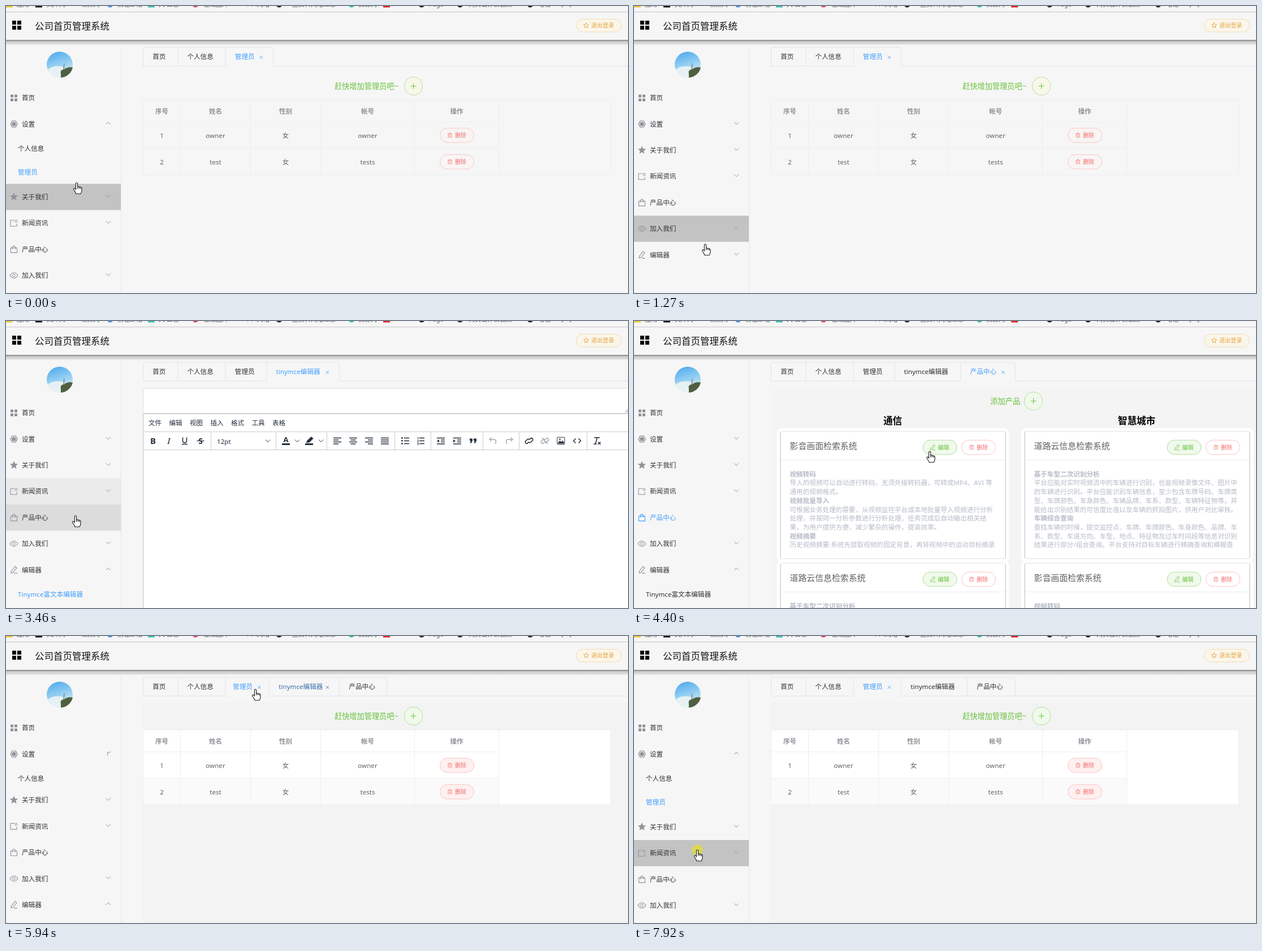
An HTML page for the animation above (8 s loop, 1100x509 px).

```html
<!DOCTYPE html>
<html lang="zh-CN">
<head>
<meta charset="utf-8">
<style>
html, body { margin: 0; width: 100%; height: 100%; overflow: hidden; background: #f6f6f6; }
svg { display: block; }
text { font-family: 'Noto Sans', 'Noto Sans CJK SC', 'Noto Sans CJK', sans-serif; white-space: pre; }
</style>
</head>
<body>
<svg id="stage" width="1100" height="509"></svg>
<script>
const LOOP = 8000, INK = '#303133', BLUE = '#409eff', GREEN = '#67c23a', RED = '#f56c6c', GREY = '#909399';

// ---- time ----
// [first change, last change, number of changes]
const bursts = [[60, 320, 4], [460, 1190, 11], [1270, 2060, 12], [2140, 2880, 11], [2960, 3590, 10], [3730, 4460, 11],
  [4540, 4980, 7], [5140, 5940, 12], [6020, 6750, 11], [6830, 7620, 12], [7700, 7920, 4]];
const snap = t => {
  let s = 0;
  for (const [a, b, n] of bursts) {
    const d = (b - a) / (n - 1);
    if (t >= a) s = a + Math.min(n - 1, Math.floor((t - a) / d + .12)) * d;
  }
  return s;
};
const clamp = v => Math.max(0, Math.min(1, v));
const ease = v => (v = clamp(v), v * v * (3 - 2 * v));
const easeOut = v => 1 - (1 - clamp(v)) ** 2;
const during = (t, a, b, f = ease) => f((t - a) / 300) - f((t - b) / 300);
const mix = (p, a, b) => `rgb(${a.map((v, i) => Math.round(v + (b[i] - v) * p))})`;
const toBlue = p => mix(p, [48, 49, 51], [64, 158, 255]);

// ---- drawing helpers ----
const text = (s, x, mid, size = 11.6, fill = INK, more = '') =>
  `<text x="${x}" y="${mid + size * .37}" font-size="${size}" fill="${fill}" ${more}>${s}</text>`;
const rect = (x, y, w, h, fill, stroke = 'none', r = 0) =>
  `<rect x="${x}" y="${y}" width="${w}" height="${h}" rx="${r}" fill="${fill}" stroke="${stroke}"/>`;
const line = (d, stroke, w = 1, fill = 'none') =>
  `<path d="${d}" fill="${fill}" stroke="${stroke}" stroke-width="${w}"/>`;
const circle = (x, y, r, fill, stroke = 'none') => `<circle cx="${x}" cy="${y}" r="${r}" fill="${fill}" stroke="${stroke}"/>`;
const at = (x, y, s, more = '') => `<g transform="translate(${x} ${y}) ${more}">${s}</g>`;
const MID = 'text-anchor="middle"', BOLD = 'font-weight="700"';
const starPath = r => 'M' + [...Array(10).keys()].map(i => {
  const a = i * Math.PI / 5, q = i % 2 ? r * .45 : r;
  return (q * Math.sin(a)).toFixed(2) + ' ' + (-q * Math.cos(a)).toFixed(2);
}).join('L') + 'Z';

const icons = {
  home: c => [[-6, -6], [1, -6], [-6, 1], [1, 1]].map(([x, y]) => rect(x, y, 5, 5, c, 'none', .5)).join(''),
  gear: c => line('M-3 -5.5H3L6 0L3 5.5H-3L-6 0Z', c, 1.4) + circle(0, 0, 3.6, c),
  star: c => line(starPath(7), c, .5, c),
  news: c => line('M1 -5H-6V5.5H5V1', c, 1.1) + circle(4, -3.5, 2, 'none', c),
  bag: c => line('M-5.5 -2.5H5.5V6H-5.5ZM-2.5 0V-4Q0 -8 2.5 -4V0', c, 1.1),
  eye: c => line('M-7 0Q0 -9.5 7 0Q0 9.5 -7 0Z', c, 1.1) + circle(0, 0, 2.3, 'none', c),
  pen: c => line('M-5 5.5L-4.5 2L2 -6L5 -3.5L-1.5 4.5ZM0 6H6', c, 1.1),
  trash: c => line('M-5 -3H5M-3.7 -3V4.5H3.7V-3M-1.5 -3V-5H1.5V-3M-1.2 -.5V2.5M1.2 -.5V2.5', c, .9),
  down: c => line('M-4 -2L0 2L4 -2', c, 1)
};
const icon = (name, x, y, c = GREY, scale = 1) => at(x, y, icons[name](c), `scale(${scale})`);
const pill = (x, mid, label, name, c, fill, edge) =>
  rect(x + .5, mid - 12.7, 60, 25.5, fill, edge, 12.7) + icon(name, x + 18, mid, c, .8) + text(label, x + 27, mid, 10, c);
const remove = (x, mid, fill) => pill(x, mid, '删除', 'trash', RED, fill, '#fbc4c4');
const plus = (x, fill) => circle(x, 142, 16.2, fill, '#b3e19d') + line(`M${x - 5} 142H${x + 5}M${x} 137V147`, GREEN);

// ---- fixed frame ----
function browserBar() {
  const words = [[19, '应用'], [72, '文库网'], [133, '视频网'], [197, '前往邮箱'], [270, '大 日志'], [349, '在线图片'], [422, '个人网站'],
    [495, '一些资料网站汇总'], [623, '资源网'], [748, 'Page'], [818, '网页设计模板集'], [941, '笔记'], [979, '学习']];
  const dots = [[184, '#4a90e2'], [335, '#e2445c'], [483, '#222'], [611, '#2bbfae'], [735, '#222'], [803, '#222'], [927, '#222']];
  const blocks = [[0, '#f3c53c'], [52, '#111'], [251, '#3dbfae'], [667, '#d22']];
  return words.map(([x, s]) => text(s, x, -3.5, 11, '#555')).join('') +
    dots.map(([x, c]) => circle(x, -3, 5.5, c)).join('') +
    blocks.map(([x, c]) => rect(x, -9, 12, 11.5, c)).join('') + rect(0, 10, 1100, 1, '#c6c6c6');
}
function header() {
  return [[11, 26], [20, 26], [11, 35], [20, 35]].map(([x, y]) => rect(x, y, 7, 7, '#000')).join('') +
    text('公司首页管理系统', 51, 36, 16.5, '#111') +
    rect(1008.5, 23.5, 80, 22.5, '#fbf6ea', '#f5dab1', 11.2) +
    at(1026, 34.5, line(starPath(4.8), '#e6a23c', .9)) + text('退出登录', 1035, 34.5, 10.1, '#e6a23c') +
    rect(0, 60, 1100, 10, 'url(#shade)') + rect(203, 72, 1, 437, '#e7e7e7');
}
const avatar = circle(95, 104, 23, 'url(#sky)') +
  line('M74 113Q84 103 104 109L97 127A23 23 0 0 1 74 113Z', 'none', 0, '#e6f1f3') +
  line('M97 127L97 120Q95 113 103 112Q110 107 118 109A23 23 0 0 1 97 127Z', 'none', 0, '#4f6040') +
  line('M103 102L102 113', '#8a9a8c', 2);
const defs = `<defs>
<linearGradient id="sky" x2=".3" y2="1"><stop stop-color="#4aa6ea"/><stop offset=".55" stop-color="#8fcdf3"/><stop offset="1" stop-color="#dceef5"/></linearGradient>
<linearGradient id="shade" x2="0" y2="1"><stop stop-color="#8a8a8a"/><stop offset=".2" stop-color="#a4a4a4"/><stop offset=".32" stop-color="#cfcfcf"/><stop offset=".6" stop-color="#d4d4d4"/><stop offset="1" stop-color="#f6f6f6"/></linearGradient></defs>`;
const frame = defs + rect(0, 0, 1100, 509, '#f6f6f6') + browserBar() + header() + avatar;

// ---- side menu ----
const hovers = [['about', -400, 90], ['mgr', 90, 130], ['info', 130, 170], ['set', 160, 700],
  ['about', 770, 850], ['news', 850, 910], ['goods', 910, 950], ['join', 950, 1290], ['edit', 1290, 1800], ['rich', 1790, 2340],
  ['edit', 2340, 2430], ['join', 2430, 2530], ['goods', 2530, 2620], ['news', 2620, 2700], ['about', 2690, 2990],
  ['news', 2990, 3215], ['goods', 3295, 3760], ['mgr', 7150, 7300], ['about', 7300, 7620], ['news', 7620, 9000]];
const menu = [['home', '首页', 'home'], ['set', '设置', 'gear', [['info', '个人信息'], ['mgr', '管理员']]],
  ['about', '关于我们', 'star', []], ['news', '新闻资讯', 'news', []], ['goods', '产品中心', 'bag'],
  ['join', '加入我们', 'eye', []], ['edit', '编辑器', 'pen', [['rich', 'Tinymce富文本编辑器']]]];
const ROW = 46.4, SUB = 41.4;

function sideMenu(t, active) {
  const opened = f => ({ set: 1 - during(t, 540, 5805, f), edit: f((t - 1480) / 300) });
  const open = opened(ease), turn = opened(easeOut);
  const shade = (id, y, h) => {
    const p = hovers.reduce((s, [k, a, b]) => k === id ? s + during(t, a, b, clamp) : s, 0);
    return p > .01 ? rect(0, y, 203, h, mix(clamp(p), [246, 246, 246], [195, 195, 195])) : '';
  };
  let y = 139.8, out = '';
  for (const [id, label, name, subs] of menu) {
    const mid = y + ROW / 2, on = id === active, o = open[id] || 0;
    out += shade(id, y, ROW) + icon(name, 14, mid, on ? BLUE : GREY) + text(label, 28, mid, 11.6, on ? BLUE : INK);
    if (subs) out += at(181, mid - 1.5, icons.down(GREY), `rotate(${180 * (turn[id] || 0)})`);
    y += ROW;
    if (o > 0 && subs) {
      const h = subs.length * SUB * o;
      out += `<svg x="0" y="${y}" width="203" height="${h}">` + subs.map(([k, s], i) =>
        shade(k, i * SUB, SUB) + text(s, 21, (i + .5) * SUB - .3, 11.6, k === active ? BLUE : INK)).join('') + '</svg>';
      y += h;
    }
  }
  return out;
}

// ---- tabs ----
function tabBar(t, active) {
  const list = [['home', '首页', 23.2, 0, 0], ['info', '个人信息', 46.4, 0, 0],
    ['mgr', '管理员', 34.8, 1 - during(t, 2080, 5810), during(t, 5560, 5810)]];
  if (t >= 2080) list.push(['rich', 'tinymce编辑器', 79,
    1 - ease((t - 3700) / 300) + during(t, 5100, 5810), during(t, 4800, 5100)]);
  if (t >= 3700) list.push(['goods', '产品中心', 46.4, 1 - ease((t - 5100) / 300), 0]);
  let x = 242.5, out = '', gap = [x, x];
  for (const [id, label, w, act, hover] of list) {
    const lit = clamp(act + hover), pad = 16.7 - 5.8 * hover, end = x + 2 * pad + w + 4.6 + 11.7 * lit, c = toBlue(lit);
    out += text(label, x + pad, 90, 11.6, c);
    if (lit > .3) out += line(`M${end - pad - 7} 88.5l5 5m0 -5l-5 5`, c, .9);
    if (x > 243) out += line(`M${x} 73V106`, '#e0e4eb');
    if (id === active) gap = [x, end];
    x = end;
  }
  return out + line(`M242.5 106V76Q242.5 73.5 245 73.5H${x - 3}Q${x} 73.5 ${x} 76V106`, '#e0e4eb') +
    line(`M242 106.5H${gap[0]}M${gap[1]} 106.5H1100`, '#e0e4eb');
}

// ---- pages ----
function tablePage(solid) {
  const edges = [242.5, 308.5, 432.5, 556.5, 722.5, 871.5], border = '#ebeef5';
  const row = (cells, mid, c, more = '') => cells.map((s, i) =>
    text(s, (edges[i] + edges[i + 1]) / 2, mid, 11.6, c, MID + ' ' + more)).join('');
  return (solid ? rect(242, 118, 858, 391, '#f3f3f3') + rect(242, 166, 828, 134, '#fff') + rect(242, 253, 630, 47, '#fafafa') : '') +
    text('赶快增加管理员吧~', 581, 142, 13.2, GREEN) + plus(720.5, solid ? '#f0f9eb' : '#f8f7ea') +
    rect(242.5, 166.5, 827, 133, 'none', border) +
    line('M242 205.5H872M242 252.5H872' + edges.slice(1).map(x => `M${x} 166V300`).join(''), border) +
    row(['序号', '姓名', '性别', '帐号', '操作'], 186.5, GREY, BOLD) +
    row(['1', 'owner', '女', 'owner'], 229.5, '#606266') + row(['2', 'test', '女', 'tests'], 276.5, '#606266') +
    [229.3, 276.3].map(y => remove(767, y, solid ? '#fef0f0' : '#f8f5f4')).join('');
}

function toolbar() {
  const c = '#222f3e', off = '#a3a9b0', y = 212.5;
  const menus = ['文件', '编辑', '视图', '插入', '格式', '工具', '表格'];
  const rows = (x, widths, k) => widths.map((w, i) => `M${x - 7 + (14 - w) * k} ${207.5 + i * 3.5}h${w}`).join('');
  const aligns = [[586, 0], [614, .5], [642, 1], [670, 0]].map(([x, k], i) => rows(x, i < 3 ? [14, 9, 14, 9] : [14, 14, 14, 14], k)).join('');
  const lists = [706, 733].map(x => [207.5, 212.5, 217.5].map(v => `M${x - 2} ${v}h9`).join('')).join('');
  const indents = [769, 798].map(x => `M${x - 7} 207.5h14M${x} 211h7M${x} 214.5h7M${x - 7} 218h14`).join('');
  const chain = 'M-1 2.5L-3 4.5A2.6 2.6 0 0 1 -6.5 1L-3 -2.5A2.6 2.6 0 0 1 .8 -2M1 -2.5L3 -4.5A2.6 2.6 0 0 1 6.5 -1L3 2.5A2.6 2.6 0 0 1 -.8 2';
  return menus.map((s, i) => text(s, 252 + i * 36.5, 181, 11.6, c)).join('') +
    line('M242 196.5H1100M242 228.5H1100' + [362, 477, 567, 687, 751, 843, 907, 1027].map(x => `M${x}.5 197V228`).join(''), '#ccc') +
    text('B', 260, y, 15, c, MID + ' ' + BOLD) + text('I', 288, y, 15, c, MID + ' font-style="italic" style="font-family:Noto Serif,serif"') +
    line('M312.5 206.5V212Q312.5 216 316 216T319.5 212V206.5M311 218.5H321', c, 1.6) +
    text('S', 344, y, 14, c, MID + ' font-weight="600"') + line('M337.5 212.5H350.5', c, 1.3) +
    text('12pt', 373, 213.5, 11.6, c) + [463, 515, 557].map(x => at(x, y, icons.down(c))).join('') +
    text('A', 495, 210.5, 13, c, MID + ' ' + BOLD) + rect(488, 217, 14, 3, c) + rect(529, 217, 14, 3, c) +
    line('M533 212L540 205.5L543 208.5L536.5 215L531.5 215.5Z', c, 1, c) +
    line(aligns + lists + indents, c, 1.5) +
    [207.5, 212.5, 217.5].map((v, i) => circle(700.5, v, 1.4, c) + text(i + 1, 728.5, v, 6, c, MID + ' ' + BOLD)).join('') +
    line('M766 210V215.5L762 212.7ZM791 210V215.5L795 212.7Z', 'none', 0, c) +
    line('M820 208.5h5v4l-2 4h-2.5l1.5 -4h-2zM827 208.5h5v4l-2 4h-2.5l1.5 -4h-2z', 'none', 0, c) +
    line('M858.5 206.5L855 210L858.5 213.5M855 210H863Q867 210.5 866.5 215L865 218M892.5 206.5L896 210L892.5 213.5M896 210H888Q884 210.5 884.5 215L886 218', off, 1.4) +
    at(925, y, line(chain, c, 1.6)) + at(953, y, line(chain + 'M-5 -5.5L5 5.5', off, 1.5)) +
    rect(974.8, 206.2, 13, 12.6, 'none', c, 1) + line('M976 217L979.5 212.5L982 215L984.5 212.5L987 217Z', c, .8, c) + circle(979.5, 209.8, 1.3, c) +
    line('M1007.5 208.5L1003.5 212.5L1007.5 216.5M1012.5 208.5L1016.5 212.5L1012.5 216.5', c, 1.5) +
    line('M1040 206.8H1050M1045.5 207L1042.5 217.5M1039 218H1044.5M1047 214.5l4.5 4.5m0 -4.5l-4.5 4.5', c, 1.5);
}
const editorPage = ready => rect(242.5, 119.5, 870, 44, '#fff', '#dcdfe6', 2) + line('M1095 162L1100 157M1098 162L1100 160', '#888') +
  rect(242.5, 164.5, 870, 360, '#fff', '#bdbdbd') + (ready ? toolbar() : '');

// A leading * marks a bold line.
const cards = [
  ['影音画面检索系统', `*视频转码
导入的视频可以自动进行转码，无须外接转码器，可转成MP4、AVI 等
通用的视频格式。
*视频批量导入
可根据业务处理的需要，从视频监控平台或本地批量导入视频进行分析
处理，并按同一分析参数进行分析处理，任务完成后自动输出相关结
果，为用户提供方便，减少繁杂的操作，提高效率。
*视频摘要
历史视频摘要:系统先提取视频的固定背景，再将视频中的运动目标摘录`],
  ['道路云信息检索系统', `*基于车型二次识别分析
平台应能对实时视频流中的车辆进行识别，也能视频录像文件、图片中
的车辆进行识别。平台应能识别车辆信息，至少包含车牌号码、车牌类
型、车牌颜色、车身颜色、车辆品牌、车系、款型、车辆特征物等，并
能给出识别结果的可信度比值以及车辆的抓拍图片，供用户对比审核。
*车辆综合查询
查找车辆的时候，提交监控点、车牌、车牌颜色、车身颜色、品牌、车
系、款型、车道方向、车型、地点、特征物及过车时间段等信息对识别
结果进行部分/组合查询。平台支持对目标车辆进行精确查询和模糊查`]];
const card = (x, y, [title, body]) => at(x, y,
  rect(-6, -5, 411, 238, '#fff', 'none', 9) + rect(.5, .5, 398, 226, '#fff', '#e2e2e6', 3) + line('M.5 2V225M398.5 2V225', '#dcdce0', 2) +
  text(title, 17, 26.5, 14.9, '#606266') + line('M2 51.5H397', '#ebeef5') +
  pill(252, 29, '编辑', 'pen', GREEN, '#f0f9eb', '#b3dfa0') + remove(320.5, 29, '#fff') +
  body.split('\n').map((s, i) => text(s.replace('*', ''), 17, 76.5 + i * 15.7, 11.6, '#b4bac6', s[0] === '*' ? BOLD : '')).join(''));
const goodsPage = () => rect(242, 118, 858, 391, '#f4f4f4') + text('添加产品', 630, 142, 13.3, GREEN) + plus(706.5, '#f0f9eb') +
  text('通信', 457.5, 177, 16.6, '#000', MID + ' ' + BOLD) + text('智慧城市', 889, 177, 16.6, '#000', MID + ' ' + BOLD) +
  [0, 1, 2, 3].map(i => card(258.5 + i % 2 * 432, 195 + (i >> 1) * 234, cards[(i + (i >> 1)) % 2])).join('');

// ---- pointer: [time, x, y] of the fingertip ----
const path = [[0, 125, 313], [320, 150, 228], [460, 150, 228], [600, 151, 236], [760, 151, 236], [1190, 127, 418], [1270, 126, 422],
  [1420, 130, 436], [1560, 132, 438], [1900, 140, 474], [2140, 141, 474], [2280, 142, 454], [2760, 150, 250], [2960, 146, 258],
  [3450, 123, 345], [3590, 122, 348], [3800, 122, 348], [4380, 521, 236], [4460, 545, 176], [4620, 598, 140], [4980, 525, 94],
  [5350, 520, 94], [5640, 441, 94], [6100, 441, 94], [6750, 226, 218], [6900, 222, 222], [7300, 118, 322], [7620, 112, 363], [7860, 112, 379], [8000, 112, 379]];
const clicks = [460, 1480, 2050, 3700, 5100, 5800, 7880];
function pointer(t) {
  const i = Math.max(1, path.findIndex(p => p[0] >= t)), [a, ax, ay] = path[i - 1], [b, bx, by] = path[i];
  const p = (t - a) / (b - a), x = ax + (bx - ax) * p, y = ay + (by - ay) * p;
  return (clicks.some(c => t >= c && t < c + 120) ? circle(x, y + .5, 9.8, 'rgba(226,220,50,.75)') : '') +
    at(x, y, line('M-1.6 1.6Q0 -1 1.6 1.6V8Q3.2 6.5 4.4 8.2Q6 7 7 8.8Q8.6 8.2 9 10.2V14Q9 17 7 20H-1Q-2 17 -5 13Q-6 11 -4.2 10.3Q-3 10.3 -1.6 12.3ZM1.6 8V11M4.4 8.2V11M7 8.8V11.5', '#15151c', 1.1, '#fff'));
}

function scene(t) {
  const active = t < 2080 ? 'mgr' : t < 3700 ? 'rich' : t < 5100 ? 'goods' : t < 5810 ? 'rich' : 'mgr';
  const page = active === 'mgr' ? tablePage(t > 2080) : active === 'goods' ? goodsPage() : editorPage(t > 5350 || t > 2600 && t < 3700);
  return frame + sideMenu(t, active) + page + tabBar(t, active) + pointer(t);
}

const stage = document.getElementById('stage');
let last = -1;
function tick() {
  const t = snap(performance.now() % LOOP);
  if (t !== last) stage.innerHTML = scene(last = t);
  requestAnimationFrame(tick);
}
tick();
</script>
</body>
</html>
```
